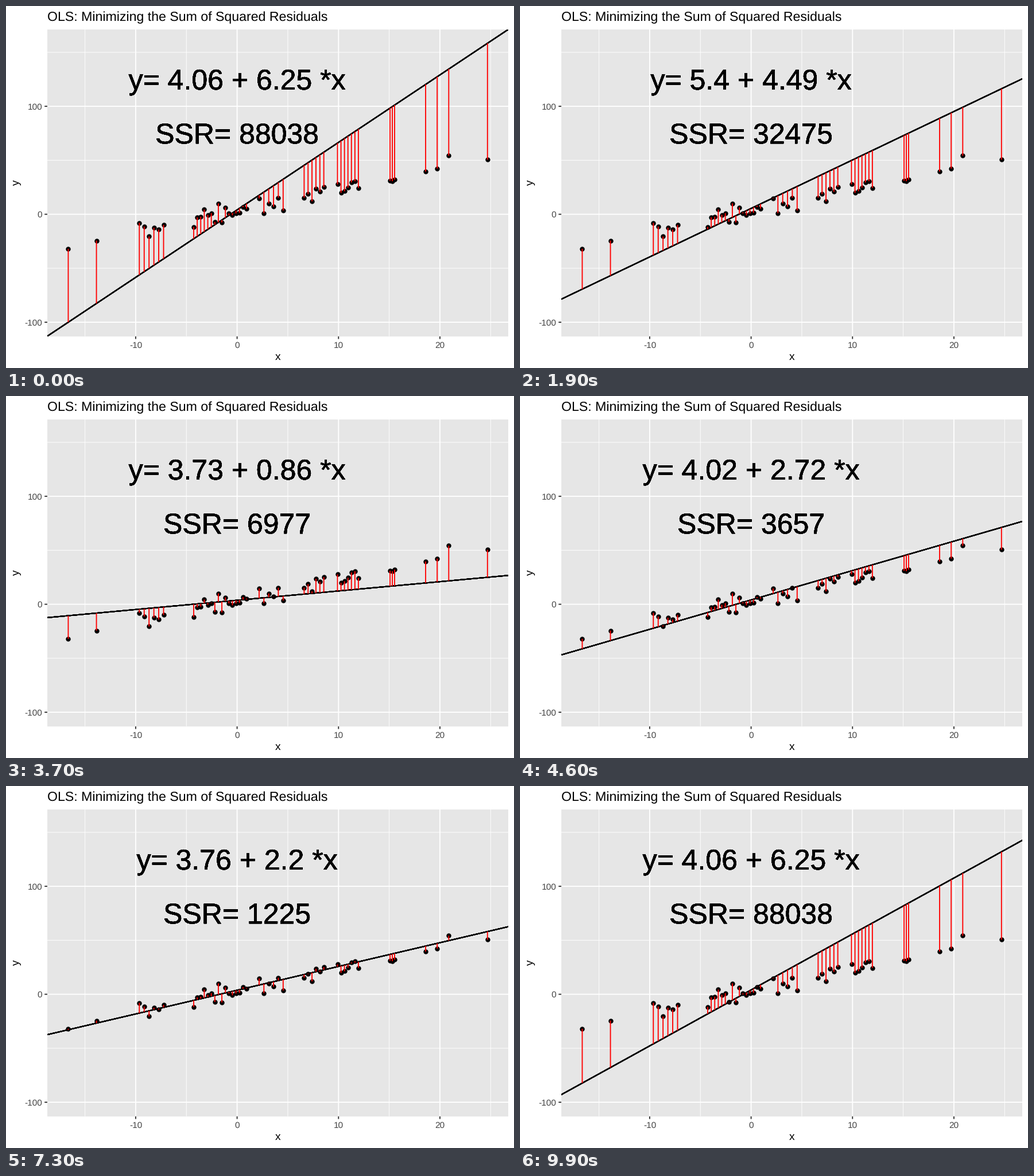
Animation, 885 px wide and 632 px high, one loop 10 s. Source, as a matplotlib script:

```python
import numpy as np
import matplotlib.pyplot as plt
from matplotlib import patheffects
from matplotlib.animation import FuncAnimation
from matplotlib.patches import Rectangle

W, H, DPI = 885, 632, 100
PT = 72 / DPI                      # points per pixel
LEFT, RIGHT, TOP, BOTTOM = 72, 875.4, 40.5, 576.6
FRAMES, INTERVAL = 100, 100

plt.rcParams["font.family"] = "Liberation Sans"
plt.rcParams["text.hinting"] = "none"
plt.rcParams["axes.unicode_minus"] = False

# Candidate fits: intercept, slope, sum of squared residuals.
FITS = [(4.06, 6.25, 88038), (4.32, -1.89, 71704), (5.4, 4.49, 32475),
        (4.01, 3.15, 7584), (3.73, 0.86, 6977), (4.02, 2.72, 3657),
        (4.58, 1.53, 1881), (5.7, 2.05, 1238), (3.76, 2.2, 1225),
        (4.03, 2.13, 1117), (3.85, 1.98, 1003)]
# Last resting frame of each fit and the length of the move to the next.
MOVES = [(4, 5), (14, 5)] + [(24 + 9 * i, 4) for i in range(9)]

# The sample: evenly filled clusters of x, scattered around the best fit.
CLUSTERS = [(-16.65, -13.87, 2), (-9.64, -7.25, 6), (-4.28, 0.93, 16),
            (2.17, 4.54, 6), (6.61, 8.55, 6), (9.9, 11.96, 7),
            (15.08, 15.53, 3), (18.59, 20.87, 3), (24.69, 24.69, 1)]
NOISE = 4.4


def px(x):
    return 402.6 + 17.667 * x


def py(y):
    return 363.6 - 1.885 * y


def fit_at(frame):
    """Return intercept, slope and the fit whose label is showing."""
    for i, (start, steps) in enumerate(MOVES):
        if frame < start + steps:
            t = max(0, frame - start) / steps
            now, nxt = FITS[i], FITS[(i + 1) % len(FITS)]
            a, b = ((1 - t) * p + t * q for p, q in zip(now[:2], nxt[:2]))
            return a, b, (now if t < 0.5 else nxt)


rng = np.random.default_rng(4)
xs = np.concatenate([np.linspace(*cluster) for cluster in CLUSTERS])
best_a, best_b, _ = FITS[-1]
ys = best_a + best_b * xs + rng.normal(0, NOISE, xs.size)

fig = plt.figure(figsize=(W / DPI, H / DPI), dpi=DPI, facecolor="white")
ax = fig.add_axes([0, 0, 1, 1])
ax.axis("off")

panel = ax.add_patch(Rectangle((LEFT, TOP), RIGHT - LEFT, BOTTOM - TOP,
                               facecolor="#E6E6E6", lw=0, zorder=0))


def rule(x, y, width, color, z=1):
    line, = ax.plot(x, y, color=color, lw=width * PT, zorder=z,
                    solid_capstyle="butt", snap=False)
    return line


def label(x, y, text, size, color="black", **kw):
    return ax.text(x, y, text, fontsize=size * PT, color=color, zorder=6,
                   **{"ha": "center", "va": "baseline", **kw})


for v in range(-15, 26, 5):
    major = v % 10 == 0
    rule([px(v)] * 2, [TOP, BOTTOM], 1.87 if major else 0.94, "white", 1 + major)
    if major:
        rule([px(v)] * 2, [BOTTOM, BOTTOM + 4.8], 1.87, "#333333")
        label(px(v), 596.4, str(v), 15.4, "#444444")
for v in range(-100, 151, 50):
    major = v % 100 == 0
    rule([LEFT, RIGHT], [py(v)] * 2, 1.87 if major else 0.94, "white", 1 + major)
    if major:
        rule([LEFT - 4.8, LEFT], [py(v)] * 2, 1.87, "#333333")
        label(63.4, py(v) + 5.5, str(v), 15.4, "#444444", ha="right")

label(72, 26.4, "OLS: Minimizing the Sum of Squared Residuals", 23.13, ha="left")
label(473.6, 618.3, "x", 19.3)
label(22, 308.5, "y", 19.3, rotation=90, rotation_mode="anchor")

ax.scatter(px(xs), py(ys), s=(8.4 * PT) ** 2, color="black", lw=0, zorder=3)

# Repeated drawing gives the hard edges of stacked marks.
stacked = [patheffects.Normal()] * 12
fit_line = rule([LEFT, RIGHT], [0, 0], 1.87, "black", 4)
fit_line.set_clip_path(panel)
fit_line.set_path_effects(stacked)
residuals = ax.vlines(px(xs), py(ys), py(ys), colors="red", lw=1.87 * PT,
                      zorder=5, capstyle="butt", snap=False)
equation = label(px(0), py(125) + 17.9, "", 50, path_effects=stacked)
score = label(px(0), py(75) + 17.9, "", 50, path_effects=stacked)

ax.set_xlim(0, W)
ax.set_ylim(H, 0)
edges = (np.array([LEFT, RIGHT]) - px(0)) / (px(1) - px(0))


def update(frame):
    a, b, (a_text, b_text, ssr) = fit_at(frame)
    fit_line.set_ydata(py(a + b * edges))
    residuals.set_segments([[(px(x), py(y)), (px(x), py(a + b * x))]
                            for x, y in zip(xs, ys)])
    equation.set_text(f"y= {a_text:g} + {b_text:g} *x")
    score.set_text(f"SSR= {ssr}")
    return fit_line, residuals, equation, score


anim = FuncAnimation(fig, update, frames=FRAMES, interval=INTERVAL,
                     repeat=True, repeat_delay=0)
plt.show()
```
